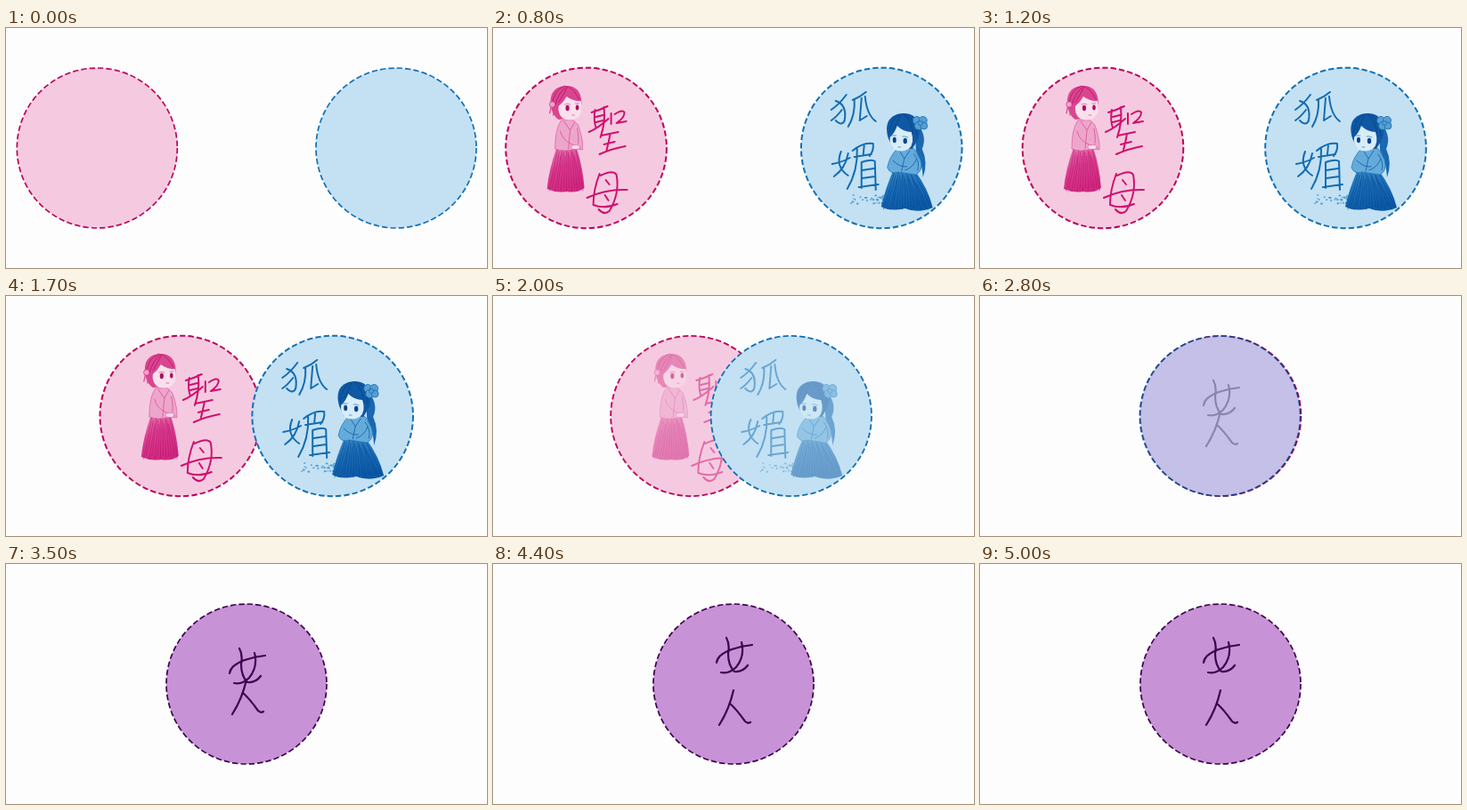
Recreate the animation shown at these times as an HTML page. Size 540 px wide and 270 px high, loop 5100 ms.

```html
<!DOCTYPE html>
<html lang="zh">
<head>
<meta charset="utf-8">
<title>Two circles merge</title>
<style>
html, body { margin: 0; width: 100%; height: 100%; overflow: hidden; background: #fdfdfd; }
svg { display: block; width: 540px; height: 270px; }
path, line { stroke-linecap: round; stroke-linejoin: round; }
.ink { fill: none; stroke-width: 2; }
.ring { stroke-dasharray: 6.4 3.025; stroke-width: 1.7; }
#pink .ink { stroke: #d0106e; }
#blue .ink { stroke: #146cb2; }
#merged .ink { stroke: #3d004e; stroke-width: 2.2; }
</style>
</head>
<body>
<svg viewBox="0 0 540 270">
  <defs>
    <linearGradient id="pinkSkirt" x1="0" y1="0" x2="0.3" y2="1">
      <stop offset="0" stop-color="#e67db3"/><stop offset="0.5" stop-color="#d8408f"/><stop offset="1" stop-color="#cf2a80"/>
    </linearGradient>
    <linearGradient id="blueSkirt" x1="0" y1="0" x2="0.3" y2="1">
      <stop offset="0" stop-color="#3b8cca"/><stop offset="0.5" stop-color="#1c6db6"/><stop offset="1" stop-color="#0c58a6"/>
    </linearGradient>
  </defs>

  <g id="pink">
    <circle class="ring" r="90" fill="#f5cae1" stroke="#bf0059"/>
    <g class="art" transform="translate(-138 -135)">
      <path fill="url(#pinkSkirt)" d="M105 134Q96 160 94 181Q105 186 116 184Q128 186 136 180Q134 155 127 134Z"/>
      <g id="pinkFolds" fill="none" stroke="#c00d6c" stroke-width="0.9" opacity="0.6"></g>
      <path fill="#eda6cb" stroke="#db5b9f" stroke-width="0.7" d="M110 104Q103 113 103 136Q113 140 126 136L134 137Q135 126 129 109L124 104Z"/>
      <path fill="none" stroke="#db5b9f" stroke-width="0.9" d="M113 105L120 115L125 106M120 115L118 136M109 116Q111 126 122 131L132 135M128 113Q130 124 129 130"/>
      <ellipse cx="126" cy="134" rx="5" ry="2.6" fill="#f9d8e8" stroke="#db5b9f" stroke-width="0.6"/>
      <path fill="#d9468f" d="M99 91C95 74 103 65 116 65C129 65 135 76 132 92L126 101L107 103Q101 99 99 91Z"/>
      <path fill="#fae0ed" d="M107 88Q113 83 116 77Q124 83 132 82Q135 95 128 101Q120 106 111 101Q106 96 107 88Z"/>
      <path fill="none" stroke="#b90f67" stroke-width="0.8" d="M116 66Q107 72 103 87M117 66Q113 74 107 84M118 66Q125 70 130 80M114 65Q101 70 100 86"/>
      <ellipse cx="117" cy="90" rx="2.1" ry="3.2" fill="#ab0f61"/>
      <ellipse cx="128" cy="89.5" rx="1.8" ry="3" fill="#ab0f61"/>
      <path fill="none" stroke="#cf4b91" stroke-width="0.7" d="M114 86Q117 84 120 86M126 85L130 85M122 98L125 98"/>
      <path fill="none" stroke="#d9468f" stroke-width="1.2" d="M99 87L97 96M102 88L101 98"/>
      <circle cx="100" cy="86" r="3.2" fill="#f0a6cb" stroke="#cf2a80" stroke-width="0.7"/>
      <path class="ink" d="M144 95Q154 92 162 88M148 92Q146 104 149 112M158 89Q160 106 154 123M149 100L157 98M149 106L157 104M141 117Q151 113 163 102
        M166 96L166 108M170 97Q179 91 181 95Q181 101 172 107L183 105
        M155 121L174 117M165 119Q163 130 161 137M158 131L170 128M153 142Q166 136 182 133"/>
      <path class="ink" d="M153 164Q146 182 146 199Q158 204 173 198M154 166Q168 159 172 165Q176 186 164 206Q158 211 152 204M139 191Q160 181 184 182M160 171L164 176M159 188L163 194"/>
    </g>
  </g>

  <g id="blue">
    <circle class="ring" r="90" fill="#c3e1f3" stroke="#1470b4"/>
    <g class="art" transform="translate(-410.5 -135)">
      <g id="petals" fill="#4f9bd2"></g>
      <path fill="#1b68b0" d="M448 105Q463 120 456 136Q463 151 457 168Q456 150 449 138Z"/>
      <path fill="url(#blueSkirt)" d="M424 159Q415 180 410 201Q420 207 437 203Q452 209 468 202Q463 181 447 159Z"/>
      <g id="blueFolds" fill="none" stroke="#044a94" stroke-width="0.9" opacity="0.65"></g>
      <path fill="#65abd9" stroke="#2379bd" stroke-width="0.8" d="M428 136Q419 145 417 157Q420 165 429 162L449 165Q458 160 454 148L447 136Z"/>
      <path fill="none" stroke="#1566ad" stroke-width="0.9" d="M430 137L436 147L442 138M436 147L433 161M423 149Q431 157 439 156M450 147Q446 157 437 160M447 142Q454 151 451 160"/>
      <path fill="#0f58a3" d="M418 124C412 104 423 96 436 96C451 96 457 111 451 126L445 136L423 135Z"/>
      <path fill="#d9edf8" d="M420 123Q426 117 428 110Q435 117 444 117Q448 130 441 136Q432 141 424 136Q419 131 420 123Z"/>
      <path fill="none" stroke="#07448b" stroke-width="0.8" d="M430 97Q421 103 419 119M432 97Q429 105 423 115M435 97Q444 104 446 119M438 97Q450 104 450 121"/>
      <ellipse cx="425" cy="126" rx="2" ry="3.3" fill="#07448b"/>
      <ellipse cx="437" cy="127" rx="2.2" ry="3.3" fill="#07448b"/>
      <path fill="none" stroke="#2676b8" stroke-width="0.7" d="M422 121L427 121M434 122Q437 121 440 123M429 134L432 134"/>
      <g fill="#569fd3" stroke="#186ab0" stroke-width="0.8">
        <circle cx="450" cy="104" r="4.5"/><circle cx="457" cy="104" r="4.5"/><circle cx="452" cy="110" r="4.5"/><circle cx="458" cy="110" r="4"/><circle cx="454" cy="107" r="2.5"/>
      </g>
      <path class="ink" d="M371 75Q363 86 354 92M359 82Q372 86 369 104Q366 111 359 104M366 92Q360 100 354 104
        M393 72Q386 78 378 81M380 81Q381 98 373 111M388 79L386 104L394 99M392 77Q394 98 404 105"/>
      <path class="ink" d="M365 139Q358 156 373 166M373 141Q370 158 357 167M355 153Q366 151 375 146
        M378 138Q390 128 401 130Q402 138 397 144M380 145L399 142M383 136Q384 161 372 181M391 132L390 142
        M388 151L388 180M388 151Q400 147 403 150L404 182M389 160L402 158M389 169L403 167M385 179L407 176"/>
    </g>
  </g>

  <g id="merged">
    <circle class="ring" cx="270" cy="135" r="90" fill="#c792d6" stroke="#3d004e"/>
    <path id="upper" class="ink" d="M262 83Q266 90 264 101Q264 114 271 121Q280 122 286 114M279 88Q283 104 273 116Q265 124 256 122M251 111Q252 102 268 96Q280 92 291 91"/>
    <path id="lower" class="ink" d="M270 142Q265 164 254 181M266 157Q273 163 283 177Q286 180 289 178"/>
  </g>
</svg>

<script>
const LOOP = 5100, STEP = 100;
const $ = id => document.getElementById(id);

// [time, centre x]
const PINK = [[700, 102.3], [1200, 138], [1700, 195.8], [1800, 206.8], [2300, 243.8], [2400, 252.5], [2800, 270.4], [3000, 270]];
const BLUE = [[700, 438], [1200, 410.5], [1700, 366.7], [1800, 355.5], [2300, 303.7], [2400, 292], [2800, 269.4], [3000, 270]];

const clamp = v => Math.max(0, Math.min(1, v));
const ramp = (t, a, b) => clamp((t - a) / (b - a));
const smooth = u => u * u * (3 - 2 * u);

// Smooth curve through the keys, at rest at both ends and at turning points
function along(keys, t) {
  const last = keys.length - 1;
  if (t <= keys[0][0]) return keys[0][1];
  if (t >= keys[last][0]) return keys[last][1];
  const rise = i => (keys[i + 1][1] - keys[i][1]) / (keys[i + 1][0] - keys[i][0]);
  const slope = i => {
    if (i === 0 || i === last) return 0;
    const a = rise(i - 1), b = rise(i);
    return a * b <= 0 ? 0 : 2 * a * b / (a + b);
  };
  const i = keys.findIndex(k => k[0] > t) - 1;
  const [t0, x0] = keys[i], [t1, x1] = keys[i + 1];
  const d = t1 - t0, u = (t - t0) / d, s = smooth(u);
  return x0 + (x1 - x0) * s + d * u * (1 - u) * ((1 - u) * slope(i) - u * slope(i + 1));
}

function add(parent, tag, attrs) {
  const el = document.createElementNS("http://www.w3.org/2000/svg", tag);
  for (const k in attrs) el.setAttribute(k, attrs[k]);
  parent.append(el);
}

function folds(id, n, top, bottom) {
  for (let i = 0; i < n; i++) {
    const u = (i + 0.5) / n;
    const x0 = top[0] + u * (top[1] - top[0]), x1 = bottom[0] + u * (bottom[1] - bottom[0]);
    const mid = (top[2] + bottom[2]) / 2;
    add($(id), "path", { d: `M${x0} ${top[2] + i % 3 * 4}Q${(x0 + x1) / 2 + 1} ${mid} ${x1} ${bottom[2] - i % 2 * 3}` });
  }
}

function scatter() {
  let seed = 7;
  const rnd = () => (seed = seed * 16807 % 2147483647) / 2147483647;
  for (let i = 0; i < 34; i++) {
    add($("petals"), "ellipse", { cx: 376 + rnd() * 40, cy: 188 + rnd() * 10, rx: 0.7 + rnd() * 1.1, ry: 0.6 + rnd() * 0.7 });
  }
}

function place(id, keys, t, art) {
  const g = $(id), ring = g.querySelector(".ring");
  g.setAttribute("transform", `translate(${along(keys, t)} 135)`);
  ring.setAttribute("r", 90 + 0.3 * art);
  ring.style.strokeWidth = 1.7 + 0.3 * art;
  g.querySelector(".art").style.opacity = art;
}

function draw(t) {
  const art = ramp(t, 0, 600) * (1 - ramp(t, 1800, 2200));
  place("pink", PINK, t, art);
  place("blue", BLUE, t, art);

  const merged = $("merged");
  merged.style.opacity = ramp(t, 2600, 3000) ** 1.3;
  merged.querySelector(".ring").style.strokeWidth = t < 3500 ? 2 : 1.7;
  const alone = t >= 3500 ? "hidden" : "visible";
  $("pink").style.visibility = $("blue").style.visibility = alone;

  const near = 12 * (1 - smooth(ramp(t, 3500, 3900)));
  $("upper").setAttribute("transform", `translate(0 ${near})`);
  $("lower").setAttribute("transform", `translate(0 ${-near})`);
}

folds("pinkFolds", 13, [105, 127, 136], [95, 136, 183]);
folds("blueFolds", 16, [424, 448, 162], [411, 467, 204]);
scatter();

const start = performance.now();
function tick() {
  const t = (performance.now() - start) % LOOP;
  draw(Math.floor(t / STEP) * STEP);
  requestAnimationFrame(tick);
}
tick();
</script>
</body>
</html>
```
